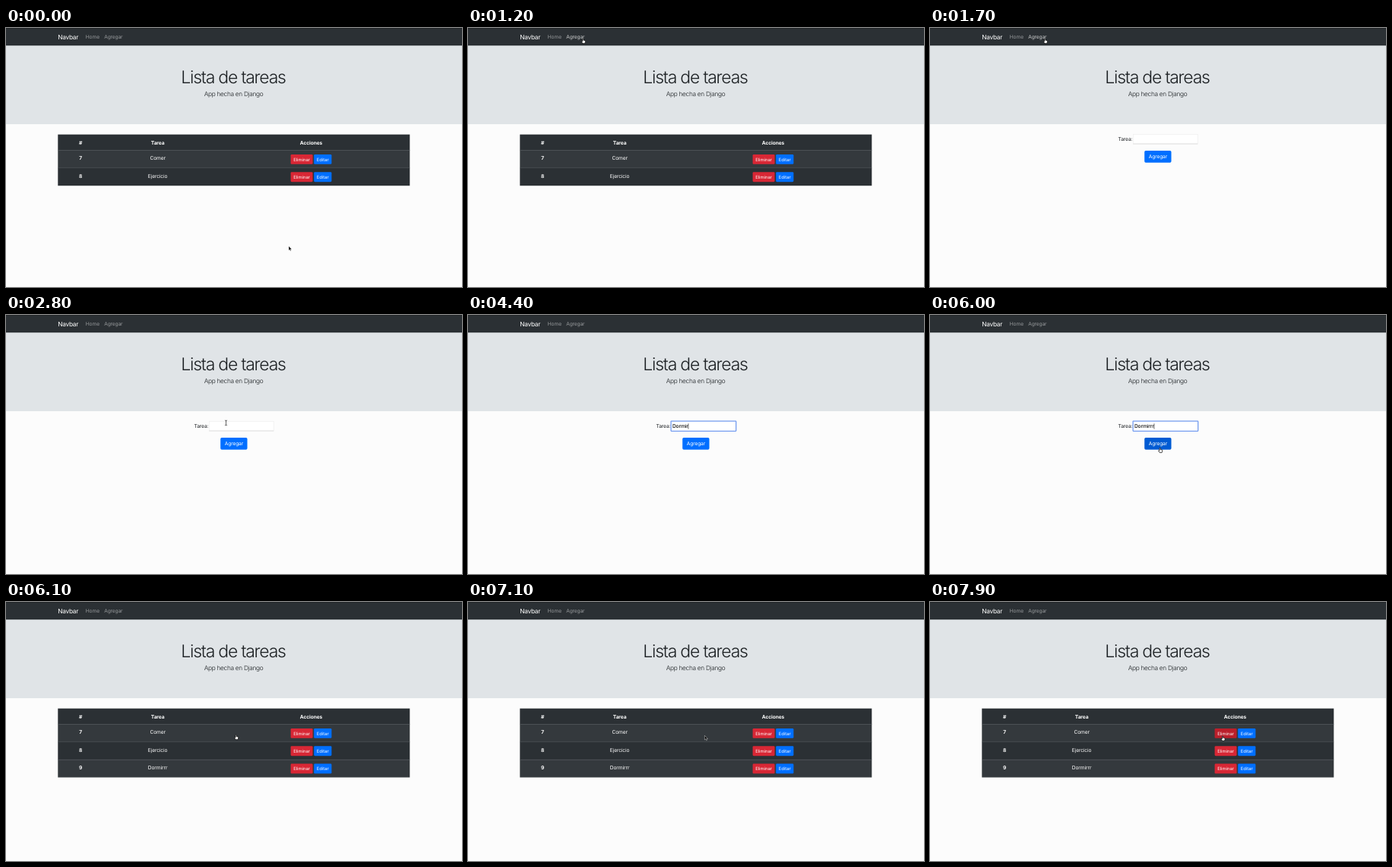
An HTML page that plays this animation: 600 px wide and 342 px high, repeating every 8 s.

```html
<!DOCTYPE html>
<html lang="es">
<head>
<meta charset="utf-8">
<title>Lista de tareas</title>
<style>
  html, body { margin: 0; width: 100%; height: 100%; overflow: hidden; background: #fcfcfc; }
  svg { display: block; width: 600px; height: 342px; }
  text {
    font: 400 6.67px Inter, "Open Sans", sans-serif;
    font-optical-sizing: none;
    letter-spacing: -.14px;
    text-rendering: geometricPrecision;
    fill: #fff;
    white-space: pre;
  }
  .mid { text-anchor: middle; }
  .bold { font-weight: 700; }
  .dark { fill: #1d2124; }
  .small { font-size: 5.83px; letter-spacing: 0; }
  .brand { font-size: 8.34px; letter-spacing: -.3px; }
  .title { font-size: 23px; font-weight: 300; letter-spacing: -1.2px; }
  .lead { font-size: 8.34px; font-weight: 300; letter-spacing: -.32px; }
  .typed { font-weight: 500; fill: #111; }
  .link { fill: #96999b; }
  .link.hover { fill: #cacbcc; }
  .delete { fill: #d82735; }
  .delete.hover { fill: #bb1f2b; }
  .primary { fill: #006fff; }
  .primary.hover { fill: #005bd3; }
</style>
</head>
<body>
<svg id="stage" viewBox="0 0 600 342">
  <rect width="600" height="342" fill="#fcfcfc"/>
  <rect width="600" height="23.5" fill="#2b3034"/>
  <rect width="600" height="1" fill="#202427"/>
  <rect y="23.5" width="600" height="103.5" fill="#e0e4e7"/>
  <text x="68.3" y="14.6" class="brand">Navbar</text>
  <text x="104.8" y="14.3" class="link">Home</text>
  <text x="129.2" y="14.3" class="link" id="addLink">Agregar</text>
  <text x="299" y="72.8" class="title dark mid">Lista de tareas</text>
  <text x="299.6" y="90.4" class="lead dark mid">App hecha en Django</text>

  <g id="listPage">
    <rect x="68.3" y="140.6" width="463" height="21" fill="#2b3034"/>
    <text x="98" y="153.7" class="bold mid">#</text>
    <text x="199.6" y="153.7" class="bold mid">Tarea</text>
    <text x="401.5" y="153.7" class="bold mid">Acciones</text>
    <g id="rows"></g>
  </g>

  <g id="formPage">
    <text x="247.6" y="149.3" class="dark">Tarea:</text>
    <rect x="267.3" y="140.4" width="84.9" height="12.6" fill="#fff" stroke="#ededed" stroke-width=".6"/>
    <path d="M267.3 153H352.2" stroke="#d2d2d2" stroke-width=".7"/>
    <g id="focus">
      <rect x="267.1" y="140.1" width="85.6" height="13.2" rx=".5" fill="#fff" stroke="#749cf0" stroke-width="1.3"/>
      <text x="268.9" y="149.3" class="typed" id="typed"></text>
      <path id="caret" d="M0 143.3V150.6" stroke="#111" stroke-width=".6"/>
    </g>
    <rect x="282.2" y="162" width="35.3" height="15.8" rx="1.7" id="submit" class="primary"/>
    <text x="299.9" y="172.3" class="mid">Agregar</text>
  </g>

  <g id="cursor">
    <path id="arrow" d="M0 0V5.7L1.3 4.5 2.2 6.5 3.1 6.1 2.3 4.2H4Z" fill="#000" stroke="#fff" stroke-width=".4"/>
    <path id="hand" d="M-.6 .5Q0-.4 .6 .5V2.4L1.5 2.5 2.4 2.8 3.1 3.1V4.7L2.5 6.5H-.4L-1.9 4.3Q-2 3.3-1 3.7L-.6 4Z" fill="#fff" stroke="#000" stroke-width=".7" stroke-linejoin="round"/>
    <path id="beam" d="M-1.4-3.2Q0-3.2 0-2.4 0-3.2 1.4-3.2M0-2.4V2.6M-1.4 3.4Q0 3.4 0 2.6 0 3.4 1.4 3.4" fill="none" stroke="#222" stroke-width=".7"/>
  </g>
</svg>
<script>
const LOOP = 8000, STEP = 100;
const $ = id => document.getElementById(id);
const show = (id, on) => $(id).setAttribute('display', on ? 'inline' : 'none');

const rowMarkup = (name, i) => {
  const y = 161.5 + i * 23.35;
  return `<g id="row${i}">
    <rect x="68.3" y="${y}" width="463" height="23.4" fill="${i % 2 ? '#2b3034' : '#34393d'}"/>
    <path d="M68.3 ${y}H531.3" stroke="#41474c" stroke-width=".5"/>
    <text x="98" y="${y + 12.7}" class="bold mid">${i + 7}</text>
    <text x="199.6" y="${y + 12.7}" class="mid">${name}</text>
    <rect x="374.6" y="${y + 5.4}" width="29" height="12.9" rx="1.3" class="delete" id="delete${i}"/>
    <text x="389.1" y="${y + 14}" class="small mid">Eliminar</text>
    <rect x="405.2" y="${y + 5.4}" width="23.2" height="12.9" rx="1.3" class="primary"/>
    <text x="416.8" y="${y + 14}" class="small mid">Editar</text>
  </g>`;
};
$('rows').innerHTML = ['Comer', 'Ejercicio', 'Dormirrr'].map(rowMarkup).join('');

// Each move follows a quadratic curve: start time, end time, start, bend, end
const moves = [
  [0, 1050, [372, 288], [440, 235], [151.3, 13.8]],
  [1900, 2800, [151.3, 13.8], [225, 85], [289.5, 142.3]],
  [5200, 5500, [289.5, 142.3], [291, 138], [296, 135]],
  [5500, 6000, [296, 135], [303, 150], [302.6, 175.2]],
  [6900, 7900, [302.6, 175.2], [345, 181], [385, 176.8]]
];
const keyTimes = [3300, 3800, 4000, 4100, 4300, 4400, 4700, 4900];
const word = 'Dormirrr';

function cursorAt(t) {
  const [from, to, a, b, c] = moves.filter(m => m[0] <= t).pop();
  const p = Math.min(1, (t - from) / (to - from));
  const u = p * p * (3 - 2 * p);
  return [0, 1].map(k => (1 - u) ** 2 * a[k] + 2 * u * (1 - u) * b[k] + u * u * c[k]);
}

function draw(time) {
  const t = Math.floor(time / STEP) * STEP;
  const form = t >= 1700 && t < 6100;
  const [x, y] = cursorAt(t);
  const over = (left, top, right, bottom) => x > left && x < right && y > top && y < bottom;

  show('listPage', !form);
  show('formPage', form);
  show('row2', t >= 6100);

  const onLink = over(126, 3, 157, 22);
  const onSubmit = form && over(282, 162, 317.5, 178);
  const onDelete = !form && over(374.6, 166.9, 403.6, 179.8);
  $('addLink').classList.toggle('hover', onLink);
  $('submit').classList.toggle('hover', onSubmit);
  $('delete0').classList.toggle('hover', onDelete);

  show('focus', t >= 2900);
  $('typed').textContent = word.slice(0, keyTimes.filter(k => k <= t).length);
  const end = form && $('typed').textContent ? $('typed').getComputedTextLength() : 0;
  $('caret').setAttribute('transform', `translate(${269.1 + end} 0)`);

  // The hand lingers after the form is sent, until the pointer moves again
  const hand = onLink || onSubmit || onDelete || (t >= 6100 && t < 7000);
  const beam = form && over(267, 140, 353, 153.5);
  show('hand', hand);
  show('beam', beam);
  show('arrow', !hand && !beam);
  show('cursor', t < 3300 || t >= 5300);
  $('cursor').setAttribute('transform', `translate(${x} ${y})`);
}

const start = performance.now();
function tick() {
  draw((performance.now() - start) % LOOP);
  requestAnimationFrame(tick);
}
tick();
</script>
</body>
</html>
```
